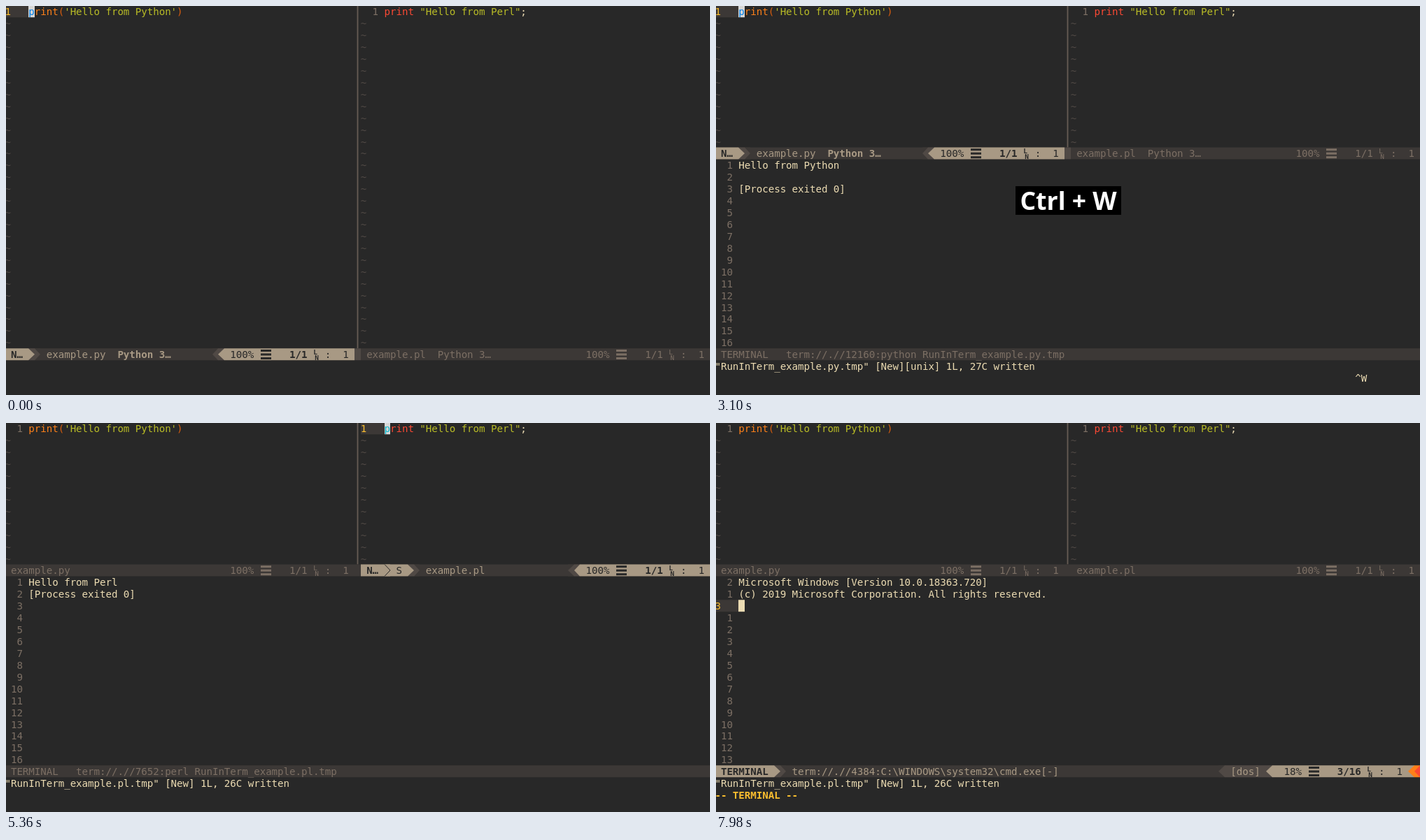
These frames come from a looping animation (1006 px wide and 557 px high, 8 s). An HTML page with a canvas:

```html
<!DOCTYPE html>
<html lang="en">
<head>
<meta charset="utf-8">
<title>Run in terminal</title>
<style>
  html, body { margin: 0; width: 100%; height: 100%; overflow: hidden; background: #282828; }
  canvas { display: block; }
</style>
</head>
<body>
<canvas id="stage" width="1006" height="557"></canvas>
<script>
const ctx = document.getElementById('stage').getContext('2d');
const LOOP = 8000, CELL_W = 8.47, CELL_H = 16.93, LEFT = -1.5, TOP = -0.7;
const BG = '#282828', BAR = '#3c3836', MID = '#504945', SPLIT = '#665c54', DIM = '#7c6f64',
      LIGHT = '#a89984', FG = '#ebdbb2', YELLOW = '#fabd2f', ORANGE = '#fe8019',
      PAREN = '#d65d0e', GREEN = '#b8bb26', RED = '#fb4934', CURSOR = '#d7d7d7';

const colX = col => Math.round(col * CELL_W + LEFT);
const rowY = row => row * CELL_H + TOP;

function setFont(size, bold) {
  ctx.font = `${bold ? 'bold ' : ''}${size}px "DejaVu Sans Mono", monospace`;
  ctx.textAlign = 'center';
}

function fill(col, row, cols, color) {
  ctx.fillStyle = color;
  ctx.fillRect(colX(col), rowY(row), colX(col + cols) - colX(col), CELL_H);
}

function text(col, row, str, color, bold) {
  setFont(14.2, bold);
  ctx.fillStyle = color;
  [...str].forEach((ch, i) =>
    ctx.fillText(ch, (col + i + 0.5) * CELL_W + LEFT, row * CELL_H + 13.3));
}

// Powerline separator; dir 1 points right, -1 points left.
function arrow(col, row, dir, color, back, thin) {
  fill(col, row, 1, back);
  const left = colX(col), right = colX(col + 1), top = rowY(row), bottom = rowY(row + 1);
  const base = dir > 0 ? left : right, tip = dir > 0 ? right : left;
  ctx.beginPath();
  ctx.moveTo(base, top);
  ctx.lineTo(tip, (top + bottom) / 2);
  ctx.lineTo(base, bottom);
  ctx.fillStyle = ctx.strokeStyle = color;
  if (thin) ctx.stroke(); else ctx.fill();
}

function position(col, row, percent, pos, color, bold) {
  text(col, row, percent, color);
  const x = colX(col + 5), y = rowY(row);
  for (const dy of [1.7, 7.2, 12.7]) ctx.fillRect(x + 1, y + dy, 15, 3);
  text(col + 10, row, pos, color, bold);
  const end = col + 11 + pos.length;
  setFont(9.5, bold);
  ctx.fillText('L', colX(end) + 3, y + 8.5);
  ctx.fillText('N', colX(end) + 5, y + 16.7);
  text(end + 2, row, ':  1', color);
}

function statusLine(col, row, file, type, active, extra) {
  fill(col, row, 59, BAR);
  if (!active) {
    text(col + 1, row, file, DIM);
    text(col + 13, row, type, DIM);
    position(col + 38, row, '100%', '1/1', DIM);
    return;
  }
  const modeEnd = extra ? 8 : 4;
  fill(col, row, modeEnd, LIGHT);
  text(col + 1, row, 'N…', BG, true);
  if (extra) {
    arrow(col + 4, row, 1, BG, LIGHT, true);
    text(col + 6, row, extra, BG);
  }
  arrow(col + modeEnd, row, 1, LIGHT, MID);
  arrow(col + modeEnd + 1, row, 1, MID, BAR);
  text(col + modeEnd + 3, row, file, LIGHT);
  text(col + modeEnd + 15, row, type, LIGHT, true);
  arrow(col + 35, row, -1, MID, BAR);
  arrow(col + 36, row, -1, LIGHT, MID);
  fill(col + 37, row, 22, LIGHT);
  position(col + 38, row, '100%', '1/1', BG, true);
}

function lineNumber(col, row, n, current) {
  if (current) fill(col, row, 4, BAR);
  text(col, row, current ? String(n) : String(n).padStart(3), current ? YELLOW : DIM);
}

function buffer(col, rows, parts, active, cursor) {
  lineNumber(col, 0, 1, active);
  let x = col + 4;
  for (const [str, color] of parts) {
    text(x, 0, str, color);
    x += str.length;
  }
  if (cursor) {
    fill(col + 4, 0, 1, CURSOR);
    text(col + 4, 0, 'p', cursor);
  }
  for (let row = 1; row < rows; row++) text(col, row, '~', MID);
}

function terminal(lines, title) {
  for (let i = 0; i < 16; i++) lineNumber(0, 13 + i, i + 1);
  lines.forEach((line, i) => text(4, 13 + i, line, FG));
  fill(0, 29, 119, BAR);
  text(1, 29, 'TERMINAL', DIM);
  text(12, 29, title, DIM);
}

function shell() {
  for (let i = 0; i < 16; i++) lineNumber(0, 13 + i, i === 2 ? 3 : Math.abs(i - 2), i === 2);
  text(4, 13, 'Microsoft Windows [Version 10.0.18363.720]', FG);
  text(4, 14, '(c) 2019 Microsoft Corporation. All rights reserved.', FG);
  fill(4, 15, 1, FG);

  fill(0, 29, 119, BAR);
  fill(0, 29, 10, LIGHT);
  text(1, 29, 'TERMINAL', BG, true);
  arrow(10, 29, 1, LIGHT, MID);
  arrow(11, 29, 1, MID, BAR);
  text(13, 29, 'term://.//4384:C:\\WINDOWS\\system32\\cmd.exe[-]', LIGHT);
  arrow(85, 29, -1, MID, BAR);
  fill(86, 29, 7, MID);
  text(87, 29, '[dos]', LIGHT);
  arrow(93, 29, -1, LIGHT, MID);
  fill(94, 29, 23, LIGHT);
  position(95, 29, ' 18%', '3/16', BG, true);
  arrow(117, 29, -1, ORANGE, LIGHT);
  arrow(118, 29, -1, RED, ORANGE);
  text(0, 31, '-- TERMINAL --', YELLOW, true);
}

function keyBox(keys) {
  const slash = keys[0] === '\\';
  ctx.font = 'bold 35.5px "Open Sans", sans-serif';
  const w = Math.round(ctx.measureText(keys).width + 13);
  ctx.fillStyle = '#000';
  ctx.fillRect(Math.round(503.5 - w / 2), slash ? 257 : 258, w, slash ? 44 : 41);
  ctx.textAlign = 'center';
  ctx.fillStyle = '#fff';
  ctx.fillText(keys, 503.5, 291.5);
}

// Each timeline is a list of [start, value]; the latest started value holds.
const at = (timeline, t) => timeline.findLast(([start]) => t >= start)[1];

const PY = '"RunInTerm_example.py.tmp"', PL = '"RunInTerm_example.pl.tmp"';
const message = [[0, ''], [1070, PY], [1240, PY + ' [New][unix] 1L, 27C written'],
  [4490, PL], [4640, PL + ' [New] 1L, 26C written']];
const messageCursor = [[0, -1], [1070, 26], [1240, -1], [1540, 54], [1620, -1], [4490, 21], [4640, -1]];
const pressed = [[0, ''], [990, '\\'], [1070, '\\  r'], [1930, ''], [3100, 'Ctrl + W'],
  [3330, 'Ctrl + W  l'], [4030, ''], [4260, '\\'], [4410, '\\  r'], [5280, ''], [6750, '\\'], [7670, '']];
const pending = [[0, ''], [990, '\\'], [1070, ''], [3100, '^W'], [3400, ''],
  [4260, '\\'], [4410, ''], [6750, '\\'], [7750, '']];
const bufferCursor = [[0, true], [1070, false], [1620, true], [4490, false], [4640, true]];
const output = [[0, []], [1700, ['Hello from Python', '', '[Process exited 0]']],
  [4640, []], [4810, ['Hello from Perl', '[Process exited 0]']]];

function draw(t) {
  const split = t >= 1620, perl = t >= 4640, inShell = t >= 7980;
  const leftActive = t < 3400, rightActive = !leftActive && !inShell;
  const bar = split ? 12 : 29, cursor = at(bufferCursor, t);

  ctx.fillStyle = BG;
  ctx.fillRect(0, 0, 1006, 557);

  buffer(0, bar, [['print', ORANGE], ['(', PAREN], ["'Hello from Python'", GREEN], [')', PAREN]],
    leftActive, leftActive && cursor && '#017fe6');
  buffer(60, bar, [['print ', RED], ['"Hello from Perl"', GREEN], [';', FG]],
    rightActive, rightActive && cursor && '#04b6cb');
  ctx.fillStyle = SPLIT;
  ctx.fillRect(501.6, 0, 1.8, rowY(bar));

  fill(59, bar, 1, leftActive ? MID : BAR);
  statusLine(0, bar, 'example.py', perl ? '' : 'Python 3…', leftActive);
  statusLine(60, bar, 'example.pl', leftActive ? 'Python 3…' : '', rightActive, 'S');

  if (inShell) shell();
  else if (split) terminal(at(output, t), perl
    ? 'term://.//7652:perl RunInTerm_example.pl.tmp'
    : 'term://.//12160:python RunInTerm_example.py.tmp');

  const line = at(message, t), caret = at(messageCursor, t);
  text(0, 30, line, FG);
  if (caret >= 0) {
    fill(caret, 30, 1, CURSOR);
    text(caret, 30, line[caret] || '', BG);
  }
  text(108, 31, at(pending, t), FG);

  const keys = at(pressed, t);
  if (keys) keyBox(keys);
}

function tick() {
  draw(performance.now() % LOOP);
  requestAnimationFrame(tick);
}
tick();
</script>
</body>
</html>
```
